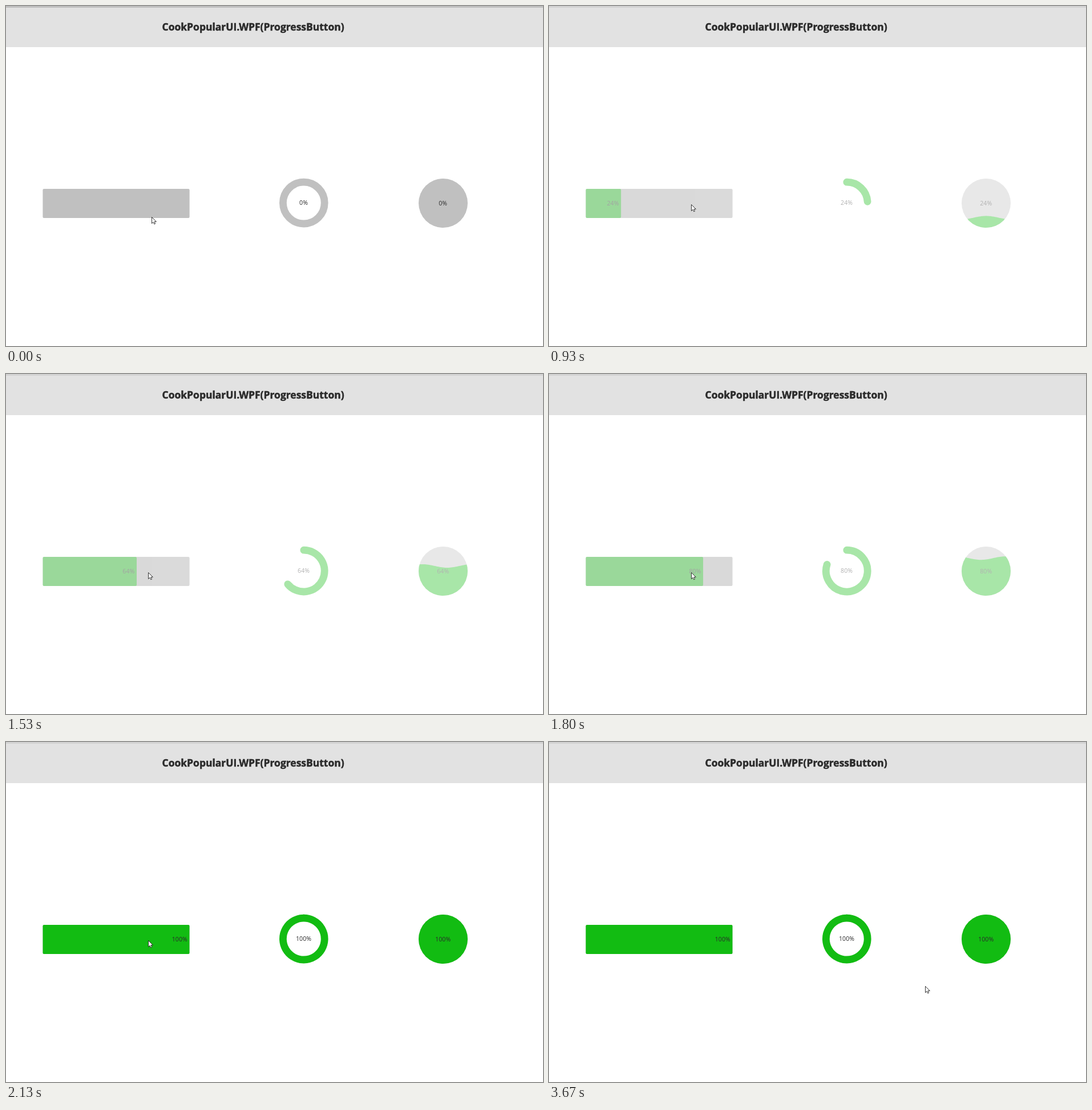
An HTML page for the animation above (3740 ms loop, 941x595 px).

```html
<!DOCTYPE html>
<html lang="en">
<head>
<meta charset="utf-8">
<title>ProgressButton</title>
<style>
  html, body { margin: 0; width: 100%; height: 100%; overflow: hidden; background: #fff; }
  svg { display: block; width: 941px; height: 595px; }
  text { font-family: "Open Sans", "Noto Sans", sans-serif; fill: #2b2b2b; }
  .label { font-size: 10.6px; text-anchor: middle; }
  #title { font-size: 17.4px; font-weight: 700; stroke: #2b2b2b; stroke-width: .5; }
  .track { fill: #c0c0c0; }
  .fill { fill: #12bc12; }
</style>
</head>
<body>
<svg viewBox="0 0 941 595">
  <defs>
    <clipPath id="disc"><circle cx="766" cy="345" r="43"/></clipPath>
  </defs>
  <rect width="941" height="72" fill="#e2e2e2"/>
  <rect id="strip" width="941" height="3"/>
  <text id="title" x="273.5" y="43">CookPopularUI.WPF(ProgressButton)</text>

  <rect class="track" x="64.5" y="320" width="257" height="51" rx="2" opacity=".36"/>
  <g class="button">
    <rect class="track" x="64.5" y="320" width="257" height="51" rx="2"/>
    <rect id="bar" class="fill" x="64.5" y="320" height="51" rx="2"/>
    <text id="barLabel" class="label" y="349" style="text-anchor:end"></text>
  </g>
  <g class="button">
    <circle id="ring" cx="521.8" cy="344.6" r="36.4" fill="none" stroke="#c0c0c0" stroke-width="12.8"/>
    <path id="arc" fill="none" stroke="#12bc12" stroke-width="12.8" stroke-linecap="round"/>
    <text class="label pct" x="521.5" y="348.4"></text>
  </g>
  <g class="button">
    <circle class="track" cx="766" cy="345" r="43"/>
    <path id="wave" class="fill" clip-path="url(#disc)"/>
    <text class="label pct" x="765.7" y="349"></text>
  </g>
  <path id="cursor" d="M.5 .5V11.6L3.1 9.2L4.8 12.8L6.6 12L5 8.4H8.4Z"
        fill="#fff" stroke="#222" stroke-width=".9" stroke-linejoin="round"/>
</svg>
<script>
const LOOP = 3740, START = 670, DONE = 2130;
const $ = id => document.getElementById(id);
const all = sel => document.querySelectorAll(sel);
const set = (id, name, value) => $(id).setAttribute(name, value);

// time, x, y of the pointer
const track = [
  [0, 255, 369], [70, 254, 364], [130, 252, 357], [200, 250, 350], [270, 249, 347],
  [2870, 249, 347], [2930, 281, 367], [3000, 350, 415], [3070, 450, 455],
  [3130, 560, 469], [3200, 665, 462], [3270, 750, 445], [3330, 791, 425],
  [3400, 745, 413], [3470, 705, 415], [3530, 678, 420], [3600, 664, 425], [3670, 659, 427]
];

function pointer(t) {
  const i = track.findIndex(p => p[0] >= t);
  if (i < 1) return track[i < 0 ? track.length - 1 : 0].slice(1);
  const a = track[i - 1], b = track[i], k = (t - a[0]) / (b[0] - a[0]);
  return [1, 2].map(n => a[n] + (b[n] - a[n]) * k);
}

// 15 pictures a second, on a 10 ms clock
function snap(t) {
  const k = Math.floor((Math.floor(t / 10) + .5) * .15);
  return Math.round(k * 20 / 3) * 10;
}

function percent(t) {
  if (t < START) return 0;
  if (t >= DONE) return 100;
  return 2 * Math.floor((t - 532) / 31);
}

function arcPath(p) {
  if (!p) return "";
  const a = Math.min(p / 100, .9999) * 2 * Math.PI, r = 36.4;
  const x = 521.8 + r * Math.sin(a), y = 344.6 - r * Math.cos(a);
  return `M521.8 ${344.6 - r}A${r} ${r} 0 ${p > 50 ? 1 : 0} 1 ${x} ${y}`;
}

function wavePath(p, t) {
  if (!p) return "";
  const top = 388 - .86 * p, crest = 766 - .06 * (t - 930);
  let d = "M720 390";
  for (let x = 720; x <= 812; x += 2) {
    const y = p === 100 ? 300 : top + 3 * (1 - Math.cos((x - crest) * 2 * Math.PI / 86));
    d += `L${x} ${y.toFixed(2)}`;
  }
  return d + "V390Z";
}

function draw(time) {
  const t = snap(time % LOOP), p = percent(t);
  const busy = t >= START && t < DONE;
  const [x, y] = pointer(t), width = 2.57 * p;

  set("strip", "fill", t < 470 ? "#c0c0c0" : "#d3d3d3");
  all(".button").forEach(g => g.setAttribute("opacity", busy ? .36 : 1));
  all(".pct").forEach(el => el.textContent = p + "%");

  set("bar", "width", width);
  set("barLabel", "x", 64.5 + width - 3.8);
  $("barLabel").textContent = p ? p + "%" : "";
  set("ring", "visibility", p ? "hidden" : "visible");
  set("arc", "d", arcPath(p));
  set("wave", "d", wavePath(p, t));
  set("cursor", "transform", `translate(${x} ${y})`);
}

// keep the heading's size right whichever font is found
const title = $("title");
title.style.fontSize = 17.4 * 319 / title.getComputedTextLength() + "px";

const begin = performance.now();
function tick() {
  draw(performance.now() - begin);
  requestAnimationFrame(tick);
}
draw(0);
requestAnimationFrame(tick);
</script>
</body>
</html>
```
